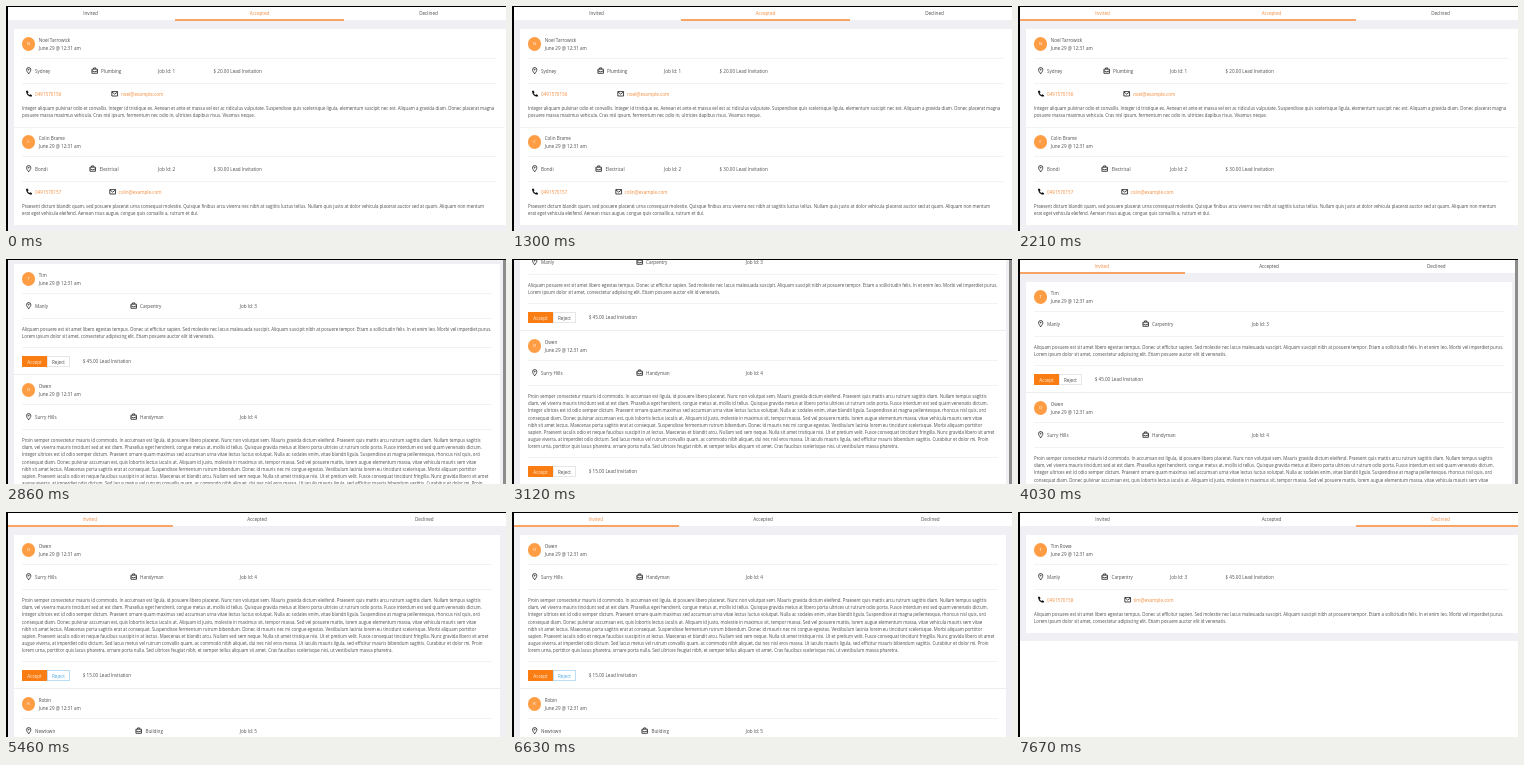
Animation, 500 px wide and 225 px high, one loop 8000 ms. Source, as an HTML page:

```html
<!DOCTYPE html>
<html lang="en">
<head>
<meta charset="utf-8">
<title>Lead inbox</title>
<style>
html, body { margin: 0; width: 100%; height: 100%; overflow: hidden; background: #fff; }
#stage { position: relative; width: 500px; height: 225px; overflow: hidden; background: #fff;
  font: 4.6px/8px "Open Sans", "Noto Sans", sans-serif; color: #4c4c4c; }
#stage * { position: absolute; box-sizing: border-box; }
#stage::before { content: ""; position: absolute; z-index: 2; inset: 0; pointer-events: none;
  border-left: 2px solid #000; border-top: 1px solid #000; }
.layer { left: 0; top: 0; width: 500px; height: 225px; }
.bg { left: 0; top: 14px; width: 507px; background: #f0f0f4; }
.card { left: 8px; top: 23px; background: #fff; }
.item { left: 0; width: 500px; }
.t { white-space: nowrap; }
.p { left: 16px; white-space: pre; font-size: 4.4px; line-height: 7.17px; }
.link { color: #f38b3c; }
.rule { left: 16px; height: 1px; background: #f3f3f3; }
.avatar { left: 15.7px; width: 13.6px; height: 13.6px; border-radius: 50%; background: #ff9d45;
  color: #fff; font-size: 4px; line-height: 13.6px; text-align: center; }
.btn { height: 11px; line-height: 10px; text-align: center; border: 1px solid #e6e6e6; }
.accept { left: 16px; width: 25px; color: #fff0e2; background: #fa7d14; border-color: #fa7d14; }
.reject { left: 41px; width: 23px; }
svg { width: 7.4px; height: 7.4px; fill: none; stroke: #222; stroke-width: .9; overflow: visible; }

.tabs { left: 0; top: 0; height: 14px; background: #fff; }
.tab { width: 33.333%; top: 3px; text-align: center; }
.ink { top: 13px; height: 2px; background: #f9a467; }
#scrollbar { right: 0; top: 0; width: 3px; height: 225px; background: #8c8c8c; }

.tabs, .tab, .ink, .layer, .reject, #page, #scrollbar { animation: 8s step-end infinite; }
.tabs { animation-name: tabs; }
.ink { animation-name: ink; }
.tab:nth-child(1) { animation-name: invitedTab; }
.tab:nth-child(2) { animation-name: acceptedTab; }
.tab:nth-child(3) { animation-name: declinedTab; }
#page { animation-name: scroll; }
#scrollbar { animation-name: scrollbar; }
#accepted { animation-name: accepted; }
#invited { animation-name: invited; }
#declined { animation-name: declined; }
.first { animation: first 8s step-end infinite; }
.rest { animation: rest 8s step-end infinite; }
.first .reject { animation-name: hoverFirst; }
.second .reject { animation-name: hoverSecond; }

@keyframes tabs { 0%, 92.6% { width: 507px } 29.2% { width: 502px } }
@keyframes ink {
  0% { left: 169px; width: 169px }
  26% { left: 84px; width: 254px }
  27.6% { left: 0; width: 338px }
  29.2% { left: 0; width: 167px }
  91% { left: 167px; width: 333px }
  92.6%, 100% { left: 338px; width: 169px }
}
@keyframes invitedTab { 0%, 92.6% { color: #4c4c4c } 24.3% { color: #f38b3c } }
@keyframes acceptedTab { 0% { color: #f38b3c } 29.2%, 100% { color: #4c4c4c } }
@keyframes declinedTab { 0% { color: #4c4c4c } 89.3%, 100% { color: #f38b3c } }
@keyframes scroll {
  0%, 50.3% { transform: none }
  35.7% { transform: translateY(-18px) }
  37.3% { transform: translateY(-44px) }
  39% { transform: translateY(-62px) }
  47.1% { transform: translateY(-44px) }
  48.7% { transform: translateY(-18px) }
}
@keyframes scrollbar { 0%, 60.1%, 100% { visibility: hidden } 29.2% { visibility: visible } }
@keyframes accepted { 0% { visibility: visible } 29.2%, 100% { visibility: hidden } }
@keyframes invited { 0%, 92.6%, 100% { visibility: hidden } 29.2% { visibility: visible } }
@keyframes declined { 0% { visibility: hidden } 92.6%, 100% { visibility: visible } }
@keyframes first { 0% { opacity: 1 } 60.1%, 100% { opacity: 0 } }
@keyframes rest { 0% { transform: none } 60.1%, 100% { transform: translateY(-111px) } }
@keyframes hoverFirst { 0% { color: #4c4c4c; border-color: #e6e6e6 } 55.2%, 100% { color: #4aa9e0; border-color: #b9def5 } }
@keyframes hoverSecond {
  0%, 86.1% { color: #4c4c4c; border-color: #e6e6e6 }
  66.6% { color: #4aa9e0; border-color: #b9def5 }
}
</style>
</head>
<body>
<div id="stage">
  <div id="page">
    <div id="accepted" class="layer"></div>
    <div id="invited" class="layer"></div>
    <div id="declined" class="layer"></div>
    <div class="tabs">
      <div class="tab">Invited</div>
      <div class="tab" style="left:33.333%">Accepted</div>
      <div class="tab" style="left:66.667%">Declined</div>
      <div class="ink"></div>
    </div>
  </div>
  <div id="scrollbar"></div>
</div>
<script>
const LINE = 7.17;
const shapes = {
  pin: '<path d="M4 7.4C2.6 5.4 1.7 4.3 1.7 2.9a2.3 2.3 0 0 1 4.6 0C6.3 4.3 5.4 5.4 4 7.4Z"/><circle cx="4" cy="2.9" r=".5"/>',
  job: '<path d="M1 2.4h6v4.4H1ZM2.8 2.2V1h2.4v1.2M1 4.2l3 1 3-1"/>',
  phone: '<path fill="#111" stroke="none" d="M1 1.2 2.6.5l1.3 2-1 1q.7 1.3 1.9 2l1-1 1.9 1.2-.7 1.7Q2 7.5 1 1.2Z"/>',
  mail: '<path d="M.9 1.7h6.2v4.8H.9ZM.9 2l3.1 2.5L7.1 2"/>'
};

const text = (x, y, s, cls = '') => `<div class="t ${cls}" style="left:${x}px;top:${y - 4}px">${s}</div>`;
const icon = (name, x, y) => `<svg viewBox="0 0 8 8" style="left:${x - 3.7}px;top:${y - 3.7}px">${shapes[name]}</svg>`;
const rule = (y, w) => `<div class="rule" style="top:${y}px;width:${w}px"></div>`;
const para = (y, lines) => `<div class="p" style="top:${y - LINE / 2}px">${lines.join('\n')}</div>`;
const panel = (right, bottom, bgBottom) =>
  `<div class="bg" style="height:${bgBottom - 14}px"></div>` +
  `<div class="card" style="width:${right - 8}px;height:${bottom - 23}px"></div>`;

// Coordinates inside an item are those of the first item on the page.
function header(lead, jobX, idX, width) {
  return `<div class="avatar" style="top:31.1px">${lead.name[0]}</div>` +
    text(32.7, 34, lead.name) + text(32.7, 41.5, 'June 29 @ 12:31 am') + rule(52, width) +
    icon('pin', 23, 65) + text(29, 65, lead.place) +
    icon('job', jobX - 6.5, 65) + text(jobX, 65, lead.job) +
    text(idX, 65, 'Job Id: ' + lead.id) + rule(77, width);
}

const item = (y, html, cls = '') => `<div class="item ${cls}" style="top:${y}px">${html}</div>`;
const price = lead => `$ ${lead.price}.00 Lead Invitation`;

const contactItem = (y, lead) => item(y,
  header(lead, lead.jobX, 152, 475) + text(207.5, 65, price(lead)) +
  icon('phone', 22.5, 87.5) + text(29, 88, lead.phone, 'link') +
  icon('mail', lead.mailX - 6, 87.5) + text(lead.mailX, 88, lead.mail, 'link') +
  para(102.3, lead.lines));

function inviteItem(y, lead, cls) {
  const row = 105.7 + LINE * lead.lines.length;
  const button = (kind, label) => `<div class="btn ${kind}" style="top:${row - 5.5}px">${label}</div>`;
  return item(y, header(lead, lead.jobX, 233.8, 470) + para(88.6, lead.lines) + rule(row - 14, 470) +
    button('reject', 'Reject') + button('accept', 'Accept') + text(76.7, row, price(lead)) +
    `<div class="rule" style="left:8px;width:486px;top:${row + 13}px;background:#ededf0"></div>`, cls);
}

const noel = {
  name: 'Noel Tarrowick', place: 'Sydney', job: 'Plumbing', id: 1, price: 20, jobX: 95,
  phone: '0491570156', mail: 'noel@example.com', mailX: 115,
  lines: [
    'Integer aliquam pulvinar odio et convallis. Integer id tristique ex. Aenean et ante et massa vel est ac ridiculus vulputate. Suspendisse quis scelerisque ligula, elementum suscipit nec est. Aliquam a gravida diam. Donec placerat magna',
    'posuere massa maximus vehicula. Cras nisl ipsum, fermentum nec odio in, ultricies dapibus risus. Vivamus neque.'
  ]
};
const colin = {
  name: 'Colin Brame', place: 'Bondi', job: 'Electrical', id: 2, price: 30, jobX: 93.5,
  phone: '0491570157', mail: 'colin@example.com', mailX: 112.5,
  lines: [
    'Praesent dictum blandit quam, sed posuere placerat urna consequat molestie. Quisque finibus arcu viverra nec nibh at sagittis luctus tellus. Nullam quis justo at dolor vehicula placerat auctor sed at quam. Aliquam non mentum',
    'erat eget vehicula eleifend. Aenean risus augue, congue quis convallis a, rutrum et dui.'
  ]
};
const tim = {
  name: 'Tim', place: 'Manly', job: 'Carpentry', id: 3, price: 45, jobX: 134,
  phone: '0491570158', mail: 'tim@example.com', mailX: 115.5,
  lines: [
    'Aliquam posuere est sit amet libero egestas tempus. Donec ut efficitur sapien. Sed molestie nec lacus malesuada suscipit. Aliquam suscipit nibh at posuere tempor. Etiam a sollicitudin felis. In et enim leo. Morbi vel imperdiet purus.',
    'Lorem ipsum dolor sit amet, consectetur adipiscing elit. Etiam posuere auctor elit id venenatis.'
  ]
};
const owen = {
  name: 'Owen', place: 'Surry Hills', job: 'Handyman', id: 4, price: 15, jobX: 134,
  lines: [
    'Proin semper consectetur mauris id commodo. In accumsan est ligula, id posuere libero placerat. Nunc non volutpat sem. Mauris gravida dictum eleifend. Praesent quis mattis arcu rutrum sagittis diam. Nullam tempus sagittis',
    'diam, vel viverra mauris tincidunt sed at est diam. Phasellus eget hendrerit, congue metus at, mollis id tellus. Quisque gravida metus at libero porta ultrices ut rutrum odio porta. Fusce interdum est sed quam venenatis dictum.',
    'Integer ultrices est id odio semper dictum. Praesent ornare quam maximus sed accumsan urna vitae lectus luctus volutpat. Nulla ac sodales enim, vitae blandit ligula. Suspendisse at magna pellentesque, rhoncus nisl quis, orci',
    'consequat diam. Donec pulvinar accumsan est, quis lobortis lectus iaculis at. Aliquam id justo, molestie in maximus sit, tempor massa. Sed vel posuere mattis, lorem augue elementum massa, vitae vehicula mauris sem vitae',
    'nibh sit amet lectus. Maecenas porta sagittis erat at consequat. Suspendisse fermentum rutrum bibendum. Donec id mauris nec mi congue egestas. Vestibulum lacinia lorem eu tincidunt scelerisque. Morbi aliquam porttitor',
    'sapien. Praesent iaculis odio et neque faucibus suscipit in at lectus. Maecenas et blandit arcu. Nullam sed sem neque. Nulla sit amet tristique nisi. Ut et pretium velit. Fusce consequat tincidunt fringilla. Nunc gravida libero sit amet',
    'augue viverra, at imperdiet odio dictum. Sed lacus metus vel rutrum convallis quam, ac commodo nibh aliquet, dui nec nisl eros massa. Ut iaculis mauris ligula, sed efficitur mauris bibendum sagittis. Curabitur et dolor mi. Proin',
    'lorem urna, porttitor quis lacus pharetra, ornare porta nulla. Sed ultrices feugiat nibh, et semper tellus aliquam sit amet. Cras faucibus scelerisque nisi, ut vestibulum massa pharetra.'
  ]
};
const robin = {
  name: 'Robin', place: 'Newtown', job: 'Building', id: 5, price: 25, jobX: 139.5, lines: noel.lines
};

const fill = (id, html) => { document.getElementById(id).innerHTML = html; };

fill('accepted', panel(499.5, 219, 225) + contactItem(0, noel) +
  '<div class="rule" style="left:8px;width:491px;top:121px"></div>' + contactItem(98, colin));
fill('invited', panel(494, 400, 406) + inviteItem(0, tim, 'first') +
  `<div class="rest">${inviteItem(111, owen, 'second')}${inviteItem(265, robin)}</div>`);
fill('declined', panel(499.5, 121, 128.5) + contactItem(0, { ...tim, name: 'Tim Rowe', jobX: 93.5 }));
</script>
</body>
</html>
```
